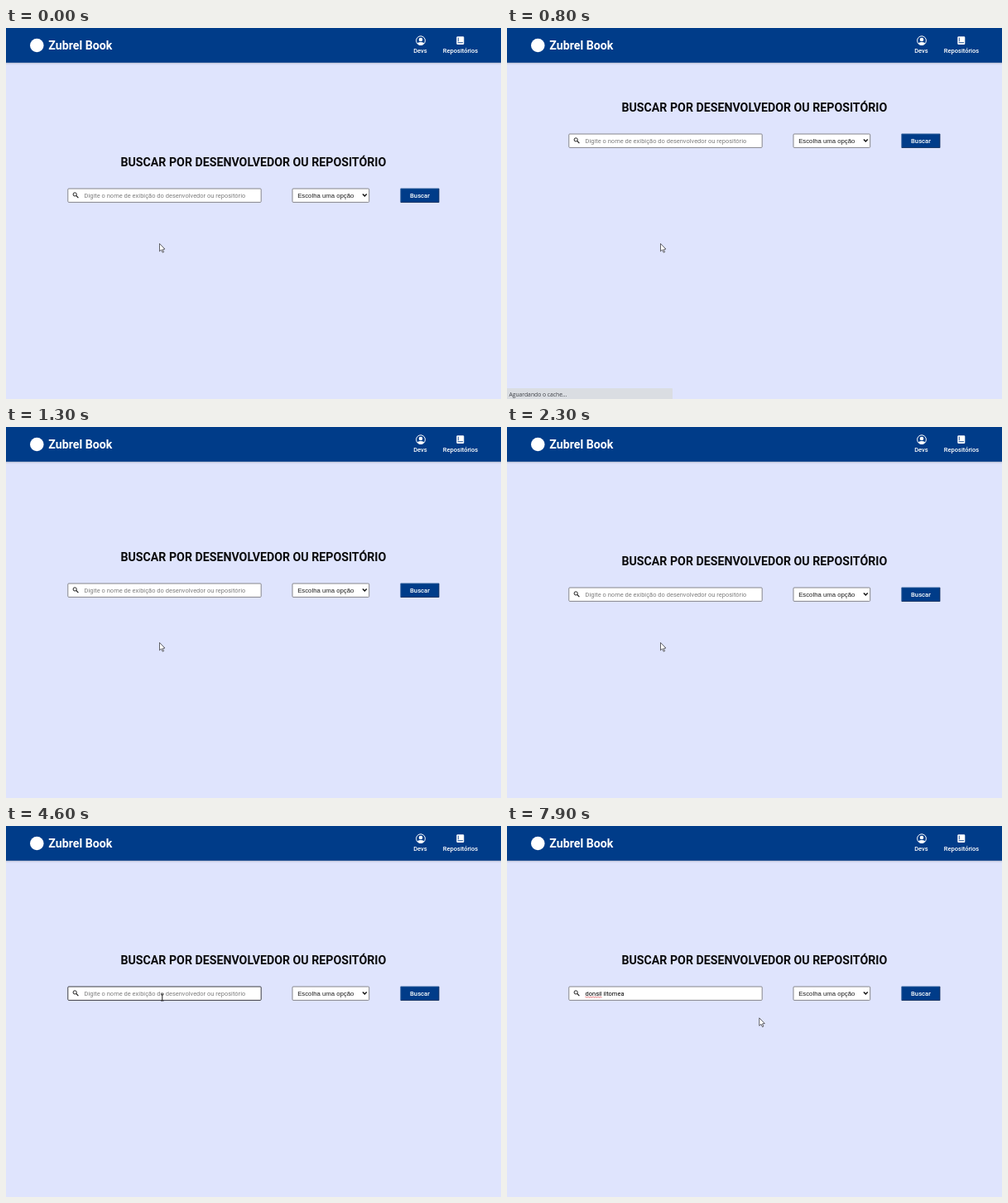
Animation, 598 px wide and 448 px high, one loop 8000 ms. Source, as an HTML page with a canvas:

```html
<!DOCTYPE html>
<html lang="pt-BR">
<head>
<meta charset="utf-8">
<title>Busca</title>
<style>
  html, body { margin: 0; width: 100%; height: 100%; overflow: hidden; background: #dfe4fd; }
  canvas { display: block; width: 598px; height: 448px; }
</style>
</head>
<body>
<canvas id="stage"></canvas>
<script>
const W = 598, H = 448, LOOP = 8000, STEP = 100;
const BLUE = '#003c89', PAGE = '#dfe4fd';
const ROBOTO = 'Roboto, sans-serif';
const NAME = 'donsil iltomea';
const KEY_TIMES = [5100, 5200, 5300, 5400, 5600, 5700, 6300,
                   6400, 6500, 6600, 6800, 6900, 7000, 7100];
const FIRST_WORD = NAME.split(' ')[0];

const canvas = document.getElementById('stage');
const ctx = canvas.getContext('2d');
const dpr = window.devicePixelRatio || 1;
canvas.width = W * dpr;
canvas.height = H * dpr;

const clamp = v => Math.min(1, Math.max(0, v));
const span = (t, from, to) => clamp((t - from) / (to - from));
const mix = (a, b, p) => a + (b - a) * p;
const smooth = p => p * p * (3 - 2 * p);

// CSS "ease": cubic-bezier(.25, .1, .25, 1)
function ease(p) {
  const curve = (a, b, u) => 3 * a * u * (1 - u) ** 2 + 3 * b * u * u * (1 - u) + u ** 3;
  let lo = 0, hi = 1;
  for (let i = 0; i < 24; i++) {
    const mid = (lo + hi) / 2;
    if (curve(.25, .25, mid) < p) lo = mid; else hi = mid;
  }
  return curve(.1, 1, lo);
}

function text(str, x, y, font, color) {
  ctx.font = font;
  ctx.fillStyle = color;
  ctx.fillText(str, x, y);
}

function box(x, y, w, h, r, fill, stroke) {
  ctx.beginPath();
  ctx.roundRect(x, y, w, h, r);
  ctx.fillStyle = fill;
  ctx.fill();
  if (stroke) {
    ctx.strokeStyle = stroke;
    ctx.lineWidth = 1;
    ctx.stroke();
  }
}

function disc(x, y, r, color) {
  ctx.beginPath();
  ctx.arc(x, y, r, 0, Math.PI * 2);
  ctx.fillStyle = color;
  ctx.fill();
}

function line(points, color, width) {
  ctx.beginPath();
  points.forEach(([x, y]) => ctx.lineTo(x, y));
  ctx.strokeStyle = color;
  ctx.lineWidth = width;
  ctx.stroke();
}

function drawHeader() {
  ctx.save();
  ctx.shadowColor = 'rgba(0, 0, 0, .5)';
  ctx.shadowBlur = 3 * dpr;
  ctx.shadowOffsetY = .5 * dpr;
  ctx.fillStyle = BLUE;
  ctx.fillRect(-10, -10, W + 20, 51.8);
  ctx.restore();

  disc(37.3, 21, 8.3, '#fff');
  text('Zubrel Book', 51.3, 25.6, '700 14.2px ' + ROBOTO, '#fff');
  text('Devs', 492.2, 30.3, '500 7.5px ' + ROBOTO, '#fff');
  text('Repositórios', 527.8, 30.3, '500 7.5px ' + ROBOTO, '#fff');
  drawPerson(501, 15.2);
  drawBook(544.3, 10.3);
}

function drawPerson(x, y) {
  ctx.save();
  ctx.beginPath();
  ctx.arc(x, y, 5.4, 0, Math.PI * 2);
  ctx.strokeStyle = '#fff';
  ctx.lineWidth = 1;
  ctx.stroke();
  ctx.clip();
  disc(x, y - 1.2, 2.3, '#fff');
  ctx.beginPath();
  ctx.ellipse(x, y + 5, 4.4, 3.1, 0, 0, Math.PI * 2);
  ctx.fill();
  ctx.restore();
}

function drawBook(x, y) {
  box(x, y, 9, 9.6, 1.2, '#fff');
  ctx.fillStyle = BLUE;
  ctx.fillRect(x + 1.6, y + 1.4, .8, 4.6);
  ctx.fillRect(x + 1.4, y + 7, 6.4, .9);
}

function drawField(t) {
  const focused = t >= 3000 && t < 7900;
  const typed = NAME.slice(0, KEY_TIMES.filter(k => k <= t).length);
  const font = '400 7.5px ' + ROBOTO;
  box(74.8, 194, 233.4, 16.4, 1, '#fff', focused ? '#3c3c42' : '#85858b');

  ctx.beginPath();
  ctx.arc(83.2, 200.9, 2.1, 0, Math.PI * 2);
  ctx.strokeStyle = '#222';
  ctx.lineWidth = 1;
  ctx.stroke();
  line([[84.8, 202.5], [87.4, 205.1]], '#222', 1.2);

  if (typed) text(typed, 94.5, 204.8, font, '#000');
  else text('Digite o nome de exibição do desenvolvedor ou repositório', 94.5, 204.8, font, '#7c7c7c');

  ctx.font = font;
  if (t >= 6400) {
    const end = 94.5 + ctx.measureText(FIRST_WORD).width;
    const wave = [];
    for (let x = 94.5; x <= end; x += .5) wave.push([x, 206.6 + .5 * Math.sin(x * 2.1)]);
    line(wave, '#e0444c', .8);
  }

  const blinkedOff = [[3500, 4000], [4600, 5100], [6200, 6300], [7600, LOOP]]
    .some(([from, to]) => t >= from && t < to);
  if (focused && !blinkedOff) {
    ctx.fillStyle = '#000';
    ctx.fillRect(Math.round(94.5 + ctx.measureText(typed).width), 198, .9, 8.5);
  }
}

function drawForm(t) {
  const drop = t < 580 ? 0 : -100 * (1 - ease(span(t, 580, 1580)));
  ctx.save();
  ctx.translate(0, Math.round(drop));
  text('BUSCAR POR DESENVOLVEDOR OU REPOSITÓRIO', 138.4, 167, '700 14.2px ' + ROBOTO, '#0a0a0c');
  drawField(t);

  box(346, 194, 92.7, 16.4, 1, '#fff', '#85858b');
  text('Escolha uma opção', 352.2, 204.8, '400 7.75px "Liberation Sans", Arial, sans-serif', '#1c1c1c');
  line([[430.9, 200.4], [433.3, 202.9], [435.7, 200.4]], '#111', 1.4);

  box(476.6, 193.8, 46.6, 17, 0, BLUE);
  line([[476.9, 210.5], [476.9, 194.1], [523, 194.1]], '#33609a', .7);
  line([[477, 210.5], [522.9, 210.5], [522.9, 194]], '#14294f', .7);
  text('Buscar', 488, 204.8, '500 7.7px ' + ROBOTO, '#fff');
  ctx.restore();
}

function drawStatus(t) {
  const alpha = span(t, 100, 300) * (1 - span(t, 1000, 1200));
  if (!alpha) return;
  ctx.globalAlpha = alpha;
  box(-2, 435, 202, 16, 1, '#dadde2');
  text('Aguardando o cache...', 2.5, 444.6, '400 6.75px "Open Sans", sans-serif', '#3c3f45');
  ctx.globalAlpha = 1;
}

function drawPointer(t) {
  const enter = smooth(span(t, 2300, 2800));
  const leave = smooth(span(t, 7500, 7800));
  const x = mix(mix(185.5, 188.8, enter), 304.8, leave);
  const y = mix(mix(260.3, 207, enter), 231.8, leave);
  const overField = x > 75 && x < 309 && y > 194 && y < 211;
  ctx.save();
  ctx.translate(x, y);
  if (overField) {
    line([[0, -4], [0, 4]], '#222', 1);
    line([[-1.8, -4], [1.8, -4]], '#222', .9);
    line([[-1.8, 4], [1.8, 4]], '#222', .9);
  } else {
    ctx.beginPath();
    [[0, 0], [0, 9.4], [2.2, 7.5], [3.7, 10.8], [5.1, 10.2], [3.7, 7], [6.5, 6.7]]
      .forEach(([px, py]) => ctx.lineTo(px, py));
    ctx.closePath();
    ctx.fillStyle = '#fff';
    ctx.fill();
    ctx.strokeStyle = '#3c3c42';
    ctx.lineWidth = .8;
    ctx.stroke();
  }
  ctx.restore();
}

function draw(t) {
  ctx.setTransform(dpr, 0, 0, dpr, 0, 0);
  ctx.fillStyle = PAGE;
  ctx.fillRect(0, 0, W, H);
  drawForm(t);
  drawHeader();
  drawStatus(t);
  drawPointer(t);
}

const start = performance.now();
function tick() {
  const t = (performance.now() - start) % LOOP;
  draw(Math.floor(t / STEP) * STEP);
  requestAnimationFrame(tick);
}
tick();
</script>
</body>
</html>
```
